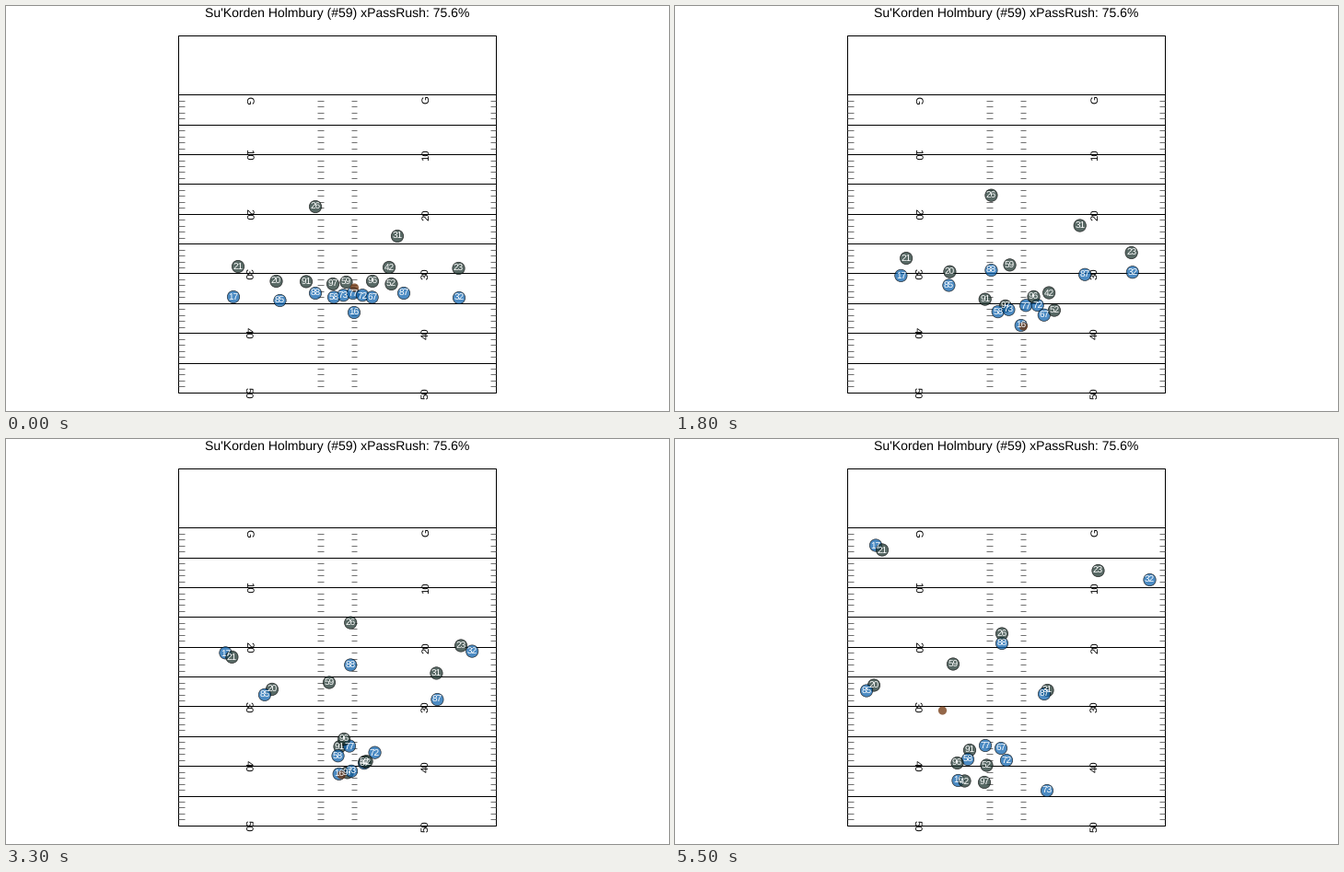
Animation, 720 px wide and 440 px high, one loop 5600 ms. Source, as a matplotlib script:

```python
import numpy as np
import matplotlib.pyplot as plt
from matplotlib.animation import FuncAnimation
from matplotlib.patches import Circle, Rectangle

W, H, DPI = 720, 440, 100
FRAMES, STEP = 56, 100
PX = 72 / DPI                                  # points per pixel

YARD = 6.47
LEFT, GOAL = 187.1, 96.37
RIGHT, TOP, MID = LEFT + 345, GOAL - 10 * YARD, GOAL + 50 * YARD

DEFENSE, OFFENSE, LEATHER = "#203731", "#1065af", "#70340c"
ALPHA = 0.75

SNAP, START, CATCH, THROW, END = 0.5, 0.6, 1.1, 4.9, 5.5

plt.rcParams["font.family"] = "Liberation Sans"
plt.rcParams["text.hinting"] = "none"

fig = plt.figure(figsize=(W / DPI, H / DPI), dpi=DPI, facecolor="white")
ax = fig.add_axes([0, 0, 1, 1])
ax.set_xlim(0, W)
ax.set_ylim(H, 0)
ax.axis("off")


def label(x, y, text, size, **kw):
    return ax.text(x, y, text, fontsize=size * PX, ha="center", va="baseline",
                   rotation_mode="anchor", **kw)


def draw_field():
    ax.add_patch(Rectangle((LEFT, TOP), RIGHT - LEFT, MID - TOP,
                           fill=False, ec="black", lw=PX, zorder=1))
    hashes = (LEFT, LEFT + 151, RIGHT - 157.5, RIGHT - 6.5)
    for yard in range(50):
        y = GOAL + yard * YARD
        if yard % 5 == 0:
            ax.plot([LEFT, RIGHT], [y, y], color="black", lw=PX, zorder=1)
            continue
        for x in hashes:
            ax.plot([x, x + 6.5], [y, y], color="#4d4d4d", lw=0.8 * PX,
                    solid_capstyle="butt", zorder=1)
    size = 11.4
    for yard in range(0, 51, 10):
        text = str(yard) if yard else "G"
        y = GOAL + yard * YARD + (0.6 if yard else 5.6)
        label(LEFT - 0.6 + 12 * YARD - 0.35 * size, y, text, size, rotation=270)
        label(RIGHT + 0.4 - 12 * YARD + 0.35 * size, y, text, size, rotation=90)


def smooth(u):
    u = min(max(u, 0), 1)
    return u * u * (3 - 2 * u)


def run(*stops):
    """Path from rest through points (x + yj) reached at even times."""
    p = np.array(stops)
    m = np.zeros(len(p), complex)
    m[1:-1] = (p[2:] - p[:-2]) / 2
    m[-1] = 1.5 * (p[-1] - p[-2]) - 0.5 * m[-2]

    def at(t):
        s = max(0, (t - START) / (END - START)) * (len(p) - 1)
        i = min(int(s), len(p) - 2)
        u = s - i
        return (p[i] + (p[i + 1] - p[i]) * smooth(u)
                + u * (1 - u) ** 2 * m[i] - u * u * (1 - u) * m[i + 1])
    return at


def shadow(mark, gap, close, until):
    """Follow another path while the gap to it eases to a closer one."""
    def at(t):
        return mark(t) + gap + (close - gap) * smooth((t - START) / (until - START))
    return at


def block(i, *stops):
    """Linemen stand shoulder to shoulder, the centre slightly ahead."""
    return run(356 + 10.4 * i + (312 + 2.2 * abs(i - 2)) * 1j, *stops)


offense = {
    16: run(378 + 333j, 373 + 353j, 352 + 368j, 307.5 + 371j),
    58: block(0, 350 + 338j, 361 + 346j, 318 + 348j),
    73: block(1, 363 + 338j, 383 + 371j, 404 + 382j),
    77: block(2, 381 + 330j, 366 + 334j, 337 + 333j),
    72: block(3, 396 + 330j, 398 + 345j, 360 + 349j),
    67: block(4, 400 + 343j, 381 + 353j, 354 + 336j),
    88: run(336 + 312j, 349 + 275j, 382 + 233j, 355 + 222j),
    87: run(432 + 312j, 451 + 285j, 468 + 283j, 401 + 277j),
    17: run(247 + 316j, 240 + 243j, 218 + 115.5j),
    85: run(297.5 + 320j, 286 + 280j, 208 + 273.5j),
    32: run(492 + 317j, 505 + 239j, 515.5 + 153j),
}
defense = {
    21: shadow(offense[17], 5 - 33j, 7 + 5j, 3.5),
    20: shadow(offense[85], -4 - 21j, 8 - 6j, 3.3),
    26: shadow(offense[88], -94j, -10.5j, END),
    31: shadow(offense[87], -7 - 62j, 3.5 - 4j, END),
    91: shadow(offense[58], -30 - 17j, 2 - 10j, 3),
    59: run(369.5 + 300j, 360 + 274j, 343 + 260j, 302 + 244.5j),
    23: run(491.5 + 285j, 496 + 232j, 459.5 + 143j),
    97: run(355 + 302j, 361 + 337j, 371 + 372j, 336 + 373j),
    96: run(398 + 299j, 384 + 322j, 355 + 329j, 306.5 + 352j),
    52: run(418.5 + 302j, 407 + 341j, 378 + 353j, 338.5 + 354.5j),
    42: run(416 + 284j, 401 + 324j, 381 + 361j, 314.5 + 371.5j),
}


class Player:
    def __init__(self, number, path, color, z):
        self.path = path
        self.dot = ax.add_patch(Circle((0, 0), 6.7, fc=color, ec="black",
                                       lw=0.7 * PX, alpha=ALPHA, zorder=z))
        self.text = label(0, 0, str(number), 10, color="white", zorder=6)

    def move(self, t):
        pos = self.path(t)
        self.dot.center = pos.real, pos.imag
        self.text.set_position((pos.real, pos.imag + 3.3))


def ball_at(t):
    """At rest, snapped, carried by the passer, then thrown."""
    def hands(s):
        return offense[16](s) + 2.5 + 1j

    if t < CATCH:
        spot = 378.5 + 306j
        return spot + (hands(CATCH) - spot) * max(0, (t - SNAP) / (CATCH - SNAP))
    if t < THROW:
        return hands(t)
    target = 290.5 + 295j
    return hands(THROW) + (target - hands(THROW)) * (t - THROW) / (END - THROW)


draw_field()
label(W / 2 - 0.5, 12, "Su'Korden Holmbury (#59) xPassRush: 75.6%", 14)
IN_FRONT = (21, 26, 42, 52, 96)
players = [Player(n, path, OFFENSE, 3) for n, path in offense.items()]
players += [Player(n, path, DEFENSE, 4 if n in IN_FRONT else 2)
            for n, path in defense.items()]
ball = ax.add_patch(Circle((0, 0), 4.6, fc=LEATHER, ec="none", alpha=ALPHA, zorder=5))


def update(frame):
    t = frame * STEP / 1000
    for player in players:
        player.move(t)
    pos = ball_at(t)
    ball.center = pos.real, pos.imag
    return []


def reset():
    return update(0)


anim = FuncAnimation(fig, update, frames=FRAMES, init_func=reset,
                     interval=STEP, repeat=True, repeat_delay=0)
plt.show()
```
